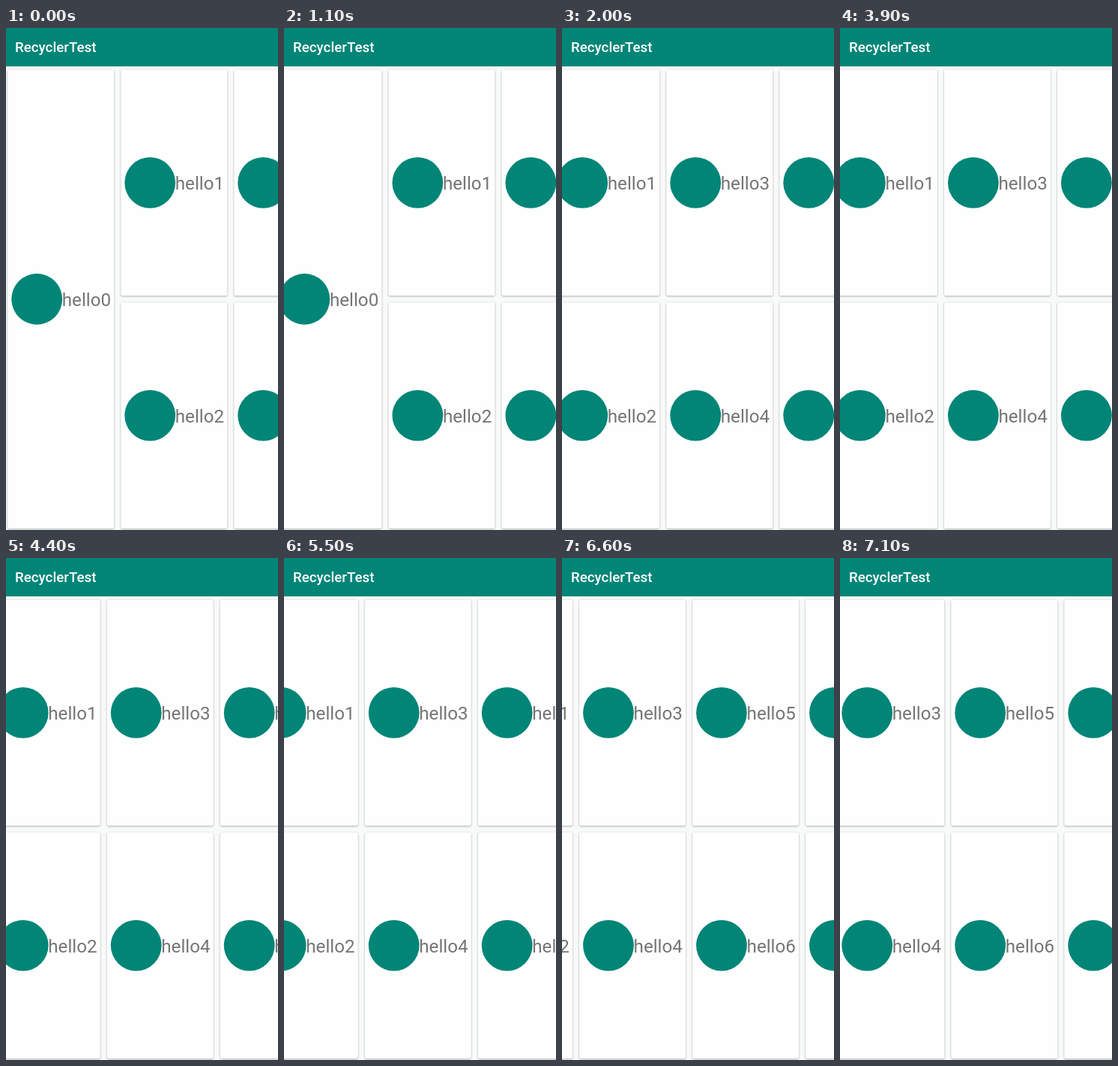
An HTML page that plays this animation: 363 px wide and 668 px high, repeating every 8.1 s.

```html
<!DOCTYPE html>
<html lang="en">
<head>
<meta charset="utf-8">
<title>RecyclerTest</title>
<style>
  html, body { margin: 0; width: 100%; height: 100%; overflow: hidden; background: #f8fafa; }
  svg { display: block; width: 100vw; height: 100vh; font-family: Roboto, sans-serif; }
  .card { fill: #fefefe; filter: drop-shadow(0 1.1px .8px rgba(0, 0, 0, .26)) drop-shadow(0 .4px 1px rgba(0, 0, 0, .1)); }
  .icon { fill: #008577; }
  .label { font-size: 24.2px; fill: #757575; }
  .bar { fill: #008577; filter: drop-shadow(0 .8px .9px rgba(0, 0, 0, .14)); }
  .title { font-size: 18.75px; font-weight: 500; fill: #fff; }
</style>
</head>
<body>
<svg viewBox="0 0 363 668">
  <g id="list"></g>
  <rect class="bar" x="-5" y="-5" width="373" height="56"/>
  <text class="title" x="12" y="32">RecyclerTest</text>
</svg>
<script>
const LOOP = 8100, STEP = 100, PITCH = 151, TOP = 55.5;
const list = document.getElementById('list');

// [time in ms, scroll offset in px]
const scrollKeys = [
  [0, 0], [900, 0], [1500, 79], [2000, 165], [3800, 165], [4400, 169.5],
  [4500, 169.5], [4800, 171.5], [4900, 171.5], [5500, 196.5],
  [6100, 238.2], [7100, 307], [LOOP, 307]
];

function add(name, attrs, text) {
  const el = document.createElementNS('http://www.w3.org/2000/svg', name);
  for (const key in attrs) el.setAttribute(key, attrs[key]);
  if (text) el.textContent = text;
  list.appendChild(el);
}

function addCard(index, column, y, height) {
  const x = 2.3 + column * PITCH, middle = y + height / 2;
  add('rect', { class: 'card', x, y, width: 142, height, rx: 2.2 });
  add('circle', { class: 'icon', cx: x + 38.9, cy: middle, r: 33.9 });
  add('text', { class: 'label', x: x + 72.5, y: middle + 9.2 }, 'hello' + index);
}

addCard(0, 0, TOP, 610.5);
for (let i = 1; i <= 8; i++) {
  addCard(i, Math.ceil(i / 2), i % 2 ? TOP : TOP + 309.7, 300.8);
}

const slope = i => (scrollKeys[i + 1][1] - scrollKeys[i][1]) / (scrollKeys[i + 1][0] - scrollKeys[i][0]);

// Harmonic mean of neighbouring slopes keeps the curve monotone.
function tangent(i) {
  if (i === 0 || i === scrollKeys.length - 1) return 0;
  const a = slope(i - 1), b = slope(i);
  return a * b > 0 ? 2 * a * b / (a + b) : 0;
}

function scrollAt(time) {
  let i = 0;
  while (i < scrollKeys.length - 2 && time >= scrollKeys[i + 1][0]) i++;
  const [t0, p0] = scrollKeys[i], [t1, p1] = scrollKeys[i + 1];
  const span = t1 - t0, u = (time - t0) / span, v = 1 - u;
  return p0 * v * v * (1 + 2 * u) + p1 * u * u * (3 - 2 * u)
    + span * u * v * (tangent(i) * v - tangent(i + 1) * u);
}

function render(time) {
  const stepped = Math.floor(time % LOOP / STEP) * STEP;
  list.setAttribute('transform', `translate(${-scrollAt(stepped).toFixed(2)} 0)`);
}

const start = performance.now();
function tick() {
  render(performance.now() - start);
  requestAnimationFrame(tick);
}
tick();
</script>
</body>
</html>
```
